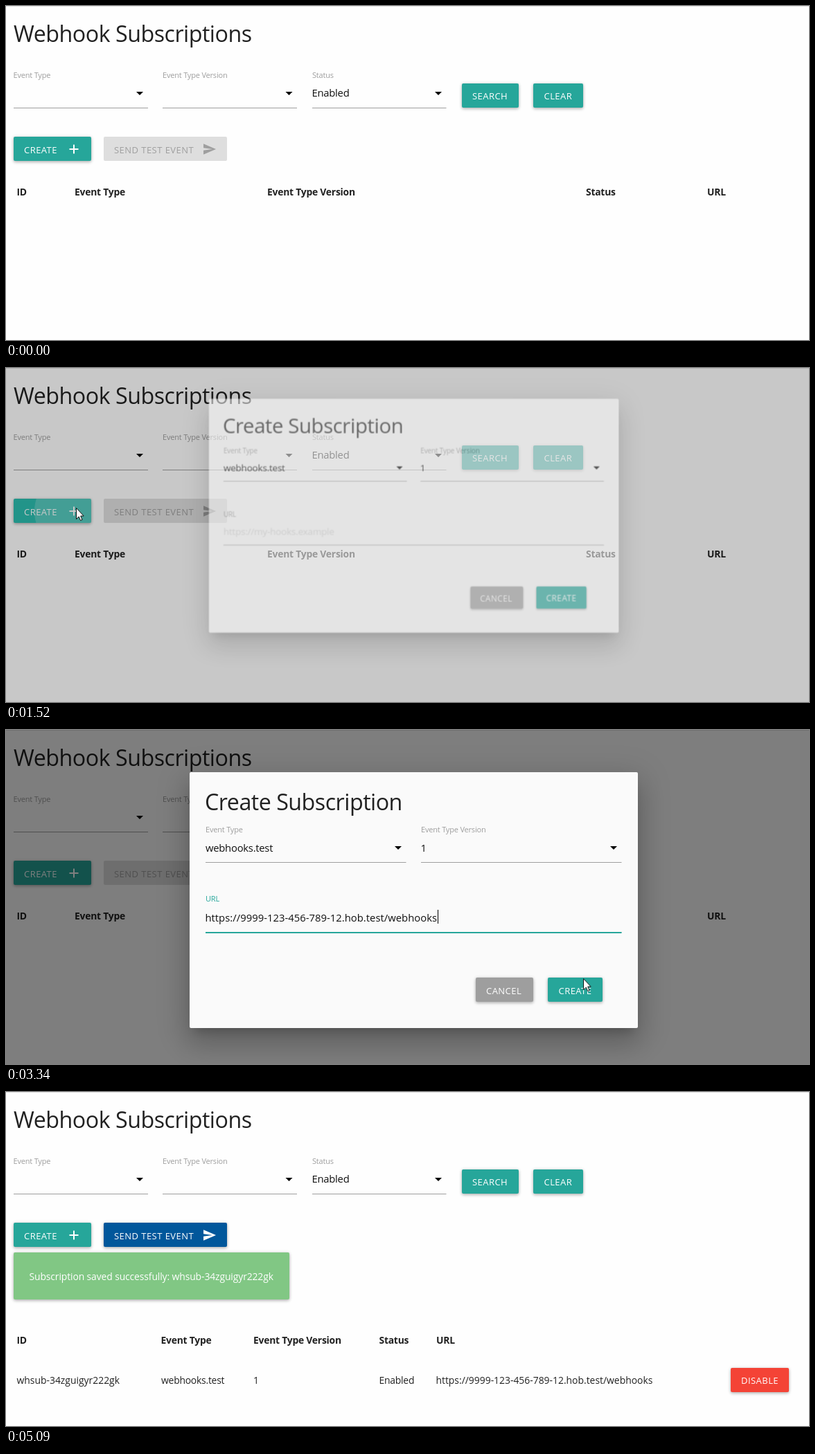
These frames come from a looping animation (1159 by 483 pixels, 6.15 s). An HTML page:

```html
<!DOCTYPE html>
<html lang="en">
<head>
<meta charset="utf-8">
<title>Webhook Subscriptions</title>
<style>
  html, body { margin: 0; width: 100%; height: 100%; overflow: hidden; background: #fefefe; }
  svg { display: block; width: 100%; height: 100%; }

  text { font: 14.8px "Open Sans", "Noto Sans", sans-serif; letter-spacing: -.017em; fill: #111; }
  .title { font-size: 32.2px; letter-spacing: -.015em; fill: #212121; }
  .label { font-size: 11px; fill: #9e9e9e; }
  .head text { font-size: 13.9px; font-weight: 700; fill: #212121; }
  .row text { font-size: 13.9px; fill: #212121; }
  .btn { fill: #fff; }
  .btn text { font-size: 13px; letter-spacing: .45px; fill: inherit; }
  .btn.off { fill: #9f9f9f; }
  .url { letter-spacing: .002em; }
  .row .code { letter-spacing: 0; }
  .row .note { fill: #fff; letter-spacing: -.008em; }
  .hint { fill: #d1d1d1; }
  .line { fill: #9e9e9e; }
  .teal { fill: #26a69a; }
  .raised { filter: drop-shadow(0 2px 2px rgba(0,0,0,.22)) drop-shadow(0 0 2px rgba(0,0,0,.14)); }
  .ripple { fill: #fff; opacity: 0; }

  /* Everything shares one 6.15 s clock: 1% = 61.5 ms */
  .anim { animation: 6.15s linear infinite; }
  .cut { animation-timing-function: step-end; }

  .before { animation-name: before; }
  .after { animation-name: after; }
  @keyframes before { 0% { opacity: 1 } 70.731%, 100% { opacity: 0 } }
  @keyframes after { 0% { opacity: 0 } 70.731%, 100% { opacity: 1 } }

  #shade { animation-name: shade; }
  @keyframes shade {
    0%, 24.714% { opacity: 0 }
    24.715% { opacity: .21; animation-timing-function: cubic-bezier(.333, .667, .667, 1) }
    27.886%, 70.73% { opacity: .5 }
    70.731%, 100% { opacity: 0 }
  }

  #modal { animation-name: modal; transform-origin: 588.5px 246px; }
  @keyframes modal {
    0%, 24.714% { opacity: 0 }
    24.715% {
      opacity: .565; transform: translateY(-33px) scale(.913);
      animation-timing-function: cubic-bezier(.333, 1, .667, 1);
    }
    28.1%, 70.73% { opacity: 1; transform: none }
    70.731%, 100% { opacity: 0; transform: none }
  }

  #open { animation-name: open; }
  @keyframes open {
    0%, 14.309% { fill: #26a69a }
    16.91%, 24.715% { fill: #2bbbad }
    29.5%, 100% { fill: #26a69a }
  }
  #wave1 { animation-name: wave1; transform-origin: 101px 207px; }
  @keyframes wave1 {
    0%, 21.626% { transform: scale(0); animation-timing-function: cubic-bezier(.333, .667, .667, 1) }
    22.275% { opacity: 0 }
    22.276%, 26.8% { opacity: .2 }
    30.081% { transform: scale(1) }
    31.545%, 100% { opacity: 0; transform: scale(1) }
  }

  #urlLabel { animation-name: urlLabel; }
  @keyframes urlLabel {
    0%, 35.772% { fill: #9e9e9e }
    39.512%, 63.577% { fill: #26a69a }
    67.642%, 100% { fill: #9e9e9e }
  }
  #focus { animation-name: focus; }
  @keyframes focus {
    0%, 35.772% { opacity: 0 }
    39.512%, 63.577% { opacity: 1 }
    67.642%, 100% { opacity: 0 }
  }
  #hint { animation-name: hint; }
  #value { animation-name: value; }
  @keyframes hint { 0% { opacity: 1 } 43.414%, 100% { opacity: 0 } }
  @keyframes value { 0% { opacity: 0 } 43.414%, 100% { opacity: 1 } }
  #caret { animation-name: caret; }
  @keyframes caret {
    0% { opacity: 0; transform: translateX(-335px) }
    35.772% { opacity: 1; transform: translateX(-335px) }
    43.414% { opacity: 1; transform: none }
    61.138%, 100% { opacity: 0; transform: none }
  }

  #save { animation-name: save; }
  @keyframes save {
    0%, 54.308% { fill: #26a69a }
    58.211%, 64.5% { fill: #2bbbad }
    65.853% {
      fill: #2bbbad;
      filter: drop-shadow(0 2px 2px rgba(0,0,0,.22)) drop-shadow(0 0 2px rgba(0,0,0,.14));
    }
    69.268%, 100% { fill: #d0e4e1; filter: none }
  }
  #saveText { animation-name: saveText; }
  @keyframes saveText {
    0%, 65.853% { fill: #fff }
    69.268%, 100% { fill: #b5c6c3 }
  }
  #wave2 { animation-name: wave2; transform-origin: 838px 376px; }
  @keyframes wave2 {
    0%, 63.577% { opacity: 0; transform: scale(0); animation-timing-function: cubic-bezier(.333, .667, .667, 1) }
    63.578%, 66.5% { opacity: .2 }
    69.268%, 100% { opacity: 0; transform: scale(1) }
  }

  #cursor { animation-name: cursor; }
  @keyframes cursor {
    0%, 8.454% { transform: translate(124px, 500px) }
    8.455% { transform: translate(124px, 462px) }
    12.357% { transform: translate(121px, 290px); animation-timing-function: ease-out }
    16.91%, 27.886% { transform: translate(101px, 202px); animation-timing-function: ease-in-out }
    31.545%, 44% { transform: translate(440px, 261px); animation-timing-function: cubic-bezier(.35, .1, .5, 1) }
    53.333% { transform: translate(830px, 355px) }
    54.308% { transform: translate(833px, 359px); animation-timing-function: ease-out }
    58.211%, 73.17% { transform: translate(838px, 376px) }
    75.447% { transform: translate(900px, 391px) }
    78.049% { transform: translate(990px, 423px) }
    82.763% { transform: translate(1078px, 476px) }
    82.764%, 100% { transform: translate(1090px, 500px) }
  }
</style>
</head>
<body>
<svg viewBox="0 0 1159 483" xmlns="http://www.w3.org/2000/svg">
  <defs>
    <path id="arrow" d="M-5 -2.5h10l-5 5z"/>
    <path id="plane" d="M2 21L23 12 2 3v7l15 2-15 2z" transform="translate(283.3 196.7) scale(.86)"/>
    <clipPath id="openClip"><rect x="11" y="189" width="112" height="35" rx="2"/></clipPath>
    <clipPath id="saveClip"><rect x="782" y="358" width="79" height="35" rx="2"/></clipPath>
  </defs>

  <rect width="1159" height="483" fill="#fefefe"/>
  <rect width="1159" height="1" fill="#e2e2e2"/>
  <text class="title" x="11" y="52">Webhook Subscriptions</text>

  <!-- filters -->
  <text class="label" x="10.5" y="103.5">Event Type</text>
  <text class="label" x="226" y="103.5">Event Type Version</text>
  <text class="label" x="442" y="103.5">Status</text>
  <text x="441.5" y="131">Enabled</text>
  <g class="line">
    <rect x="11" y="147" width="194" height="1"/>
    <rect x="226" y="147" width="194" height="1"/>
    <rect x="442" y="147" width="193.5" height="1"/>
  </g>
  <use href="#arrow" x="193" y="126.5"/>
  <use href="#arrow" x="408.5" y="126.5"/>
  <use href="#arrow" x="624" y="126.5"/>
  <g class="btn">
    <rect class="teal raised" x="658" y="112" width="82" height="35" rx="2"/>
    <text x="673" y="135">SEARCH</text>
    <rect class="teal raised" x="761" y="112" width="72" height="35" rx="2"/>
    <text x="776.5" y="135">CLEAR</text>
  </g>

  <!-- actions -->
  <g class="btn">
    <rect id="open" class="anim raised" x="11" y="189" width="112" height="35" rx="2"/>
    <g clip-path="url(#openClip)"><circle id="wave1" class="anim ripple" cx="101" cy="207" r="100"/></g>
    <text x="26" y="212.5">CREATE</text>
    <path d="M97 200.5h2v5.5h5.5v2h-5.5v5.5h-2v-5.5h-5.5v-2h5.5z"/>
  </g>
  <g class="btn off anim cut before">
    <rect x="141" y="189" width="178" height="35" rx="2" fill="#dedede"/>
    <text x="156" y="212.5">SEND TEST EVENT</text>
    <use href="#plane"/>
  </g>
  <g class="btn anim cut after">
    <rect class="raised" x="141" y="189" width="178" height="35" rx="2" fill="#01579b"/>
    <text x="156" y="212.5">SEND TEST EVENT</text>
    <use href="#plane"/>
  </g>

  <!-- empty table -->
  <g class="head anim cut before">
    <text x="15.5" y="274">ID</text>
    <text x="99" y="274">Event Type</text>
    <text x="377" y="274">Event Type Version</text>
    <text x="837" y="274">Status</text>
    <text x="1012" y="274">URL</text>
  </g>

  <!-- saved subscription -->
  <g class="anim cut after">
    <g class="row">
      <rect class="raised" x="11" y="232" width="398" height="68" rx="2" fill="#81c784"/>
      <text class="note" x="33.5" y="271.5">Subscription saved successfully: whsub-34zguigyr222gk</text>
    </g>
    <g class="head">
      <text x="15.5" y="364">ID</text>
      <text x="223.5" y="364">Event Type</text>
      <text x="357" y="364">Event Type Version</text>
      <text x="538.5" y="364">Status</text>
      <text x="621" y="364">URL</text>
    </g>
    <g class="row">
      <text class="code" x="15.5" y="422">whsub-34zguigyr222gk</text>
      <text x="224" y="422">webhooks.test</text>
      <text x="357" y="422">1</text>
      <text x="538.5" y="422">Enabled</text>
      <text class="code" x="620.5" y="422">https://9999-123-456-789-12.hob.test/webhooks</text>
    </g>
    <g class="btn">
      <rect class="raised" x="1046" y="399" width="84" height="35" rx="2" fill="#f44336"/>
      <text x="1061" y="421.5">DISABLE</text>
    </g>
  </g>

  <rect id="shade" class="anim" width="1159" height="483"/>

  <g id="modal" class="anim">
    <rect x="262" y="82" width="653" height="376" opacity=".14" style="filter:blur(19px)"/>
    <rect x="257" y="62" width="663" height="386" opacity=".12" style="filter:blur(23px)"/>
    <rect x="272" y="79" width="633" height="356" opacity=".2" style="filter:blur(7.5px)"/>
    <rect x="265" y="61" width="647" height="370" rx="2" fill="#fafafa"/>
    <text class="title" x="287" y="116">Create Subscription</text>

    <text class="label" x="288" y="147.5">Event Type</text>
    <text class="label" x="599" y="147.5">Event Type Version</text>
    <text x="288" y="176">webhooks.test</text>
    <text x="598.5" y="176">1</text>
    <rect class="line" x="288" y="191" width="289.5" height="1"/>
    <rect class="line" x="599" y="191" width="289.5" height="1"/>
    <use href="#arrow" x="566" y="170.5"/>
    <use href="#arrow" x="877" y="170.5"/>

    <text id="urlLabel" class="label anim" x="288" y="248">URL</text>
    <text id="hint" class="hint anim cut" x="288" y="276.5">https://my-hooks.example</text>
    <text id="value" class="url anim cut" x="287.5" y="276.5">https://9999-123-456-789-12.hob.test/webhooks</text>
    <rect class="line" x="288" y="292" width="600.5" height="1"/>
    <rect id="focus" class="teal anim" x="288" y="292" width="600.5" height="2"/>
    <rect id="caret" class="anim cut" x="623" y="260" width="1" height="20"/>

    <g class="btn">
      <rect class="line raised" x="678" y="358" width="83" height="35" rx="2"/>
      <text x="693" y="381.5">CANCEL</text>
      <rect id="save" class="anim raised" x="782" y="358" width="79" height="35" rx="2"/>
      <g clip-path="url(#saveClip)"><circle id="wave2" class="anim ripple" cx="838" cy="376" r="100"/></g>
      <text id="saveText" class="anim" x="797.5" y="381.5">CREATE</text>
    </g>
  </g>

  <g id="cursor" class="anim">
    <path d="M.5 .5V16.5L4.2 13 6.6 18.5 9 17.4 6.7 12H11.2Z" fill="#fff" stroke="#111"/>
  </g>
</svg>
</body>
</html>
```
